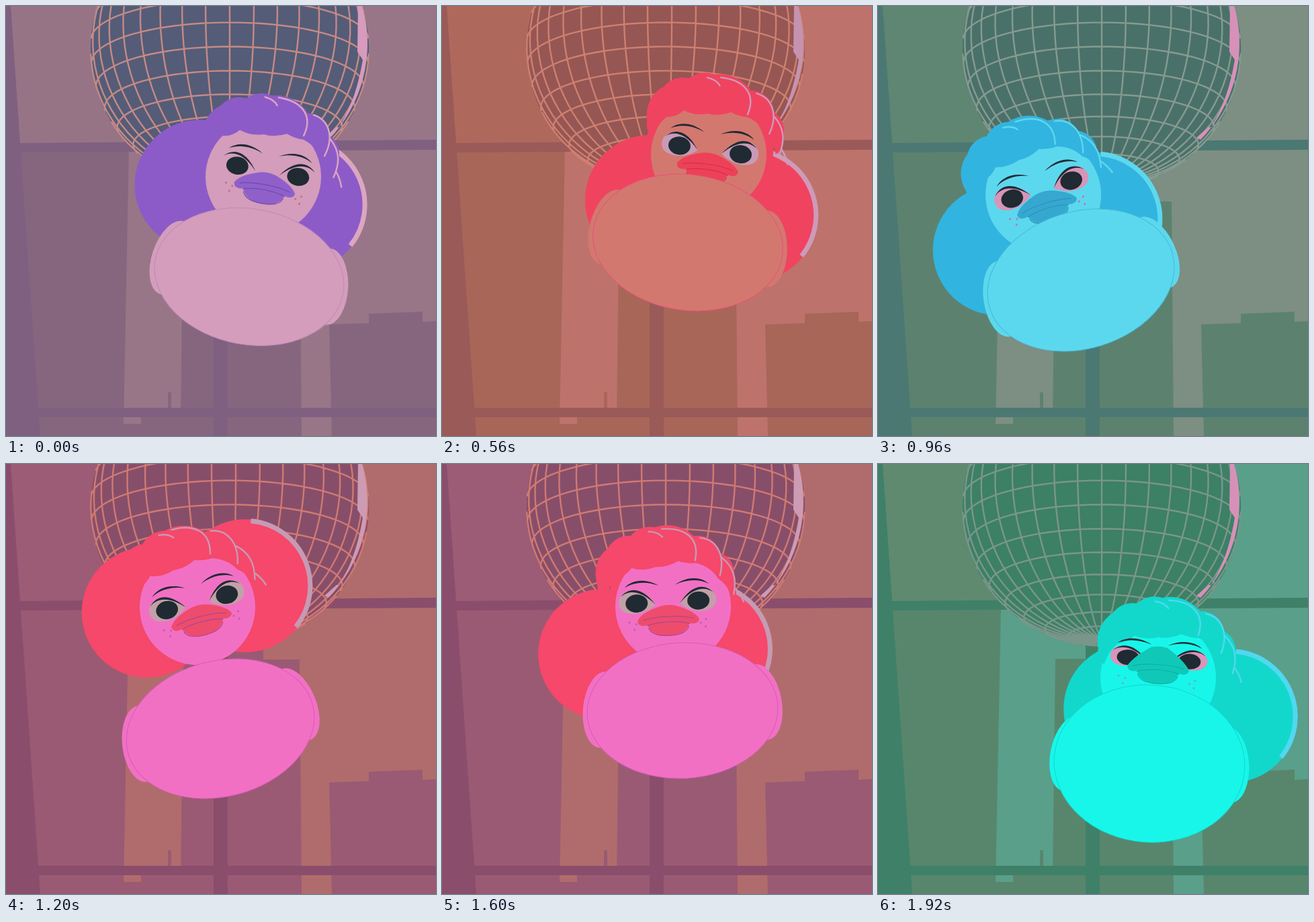
These frames come from a looping animation (640x640 px, 2 s). An HTML page:

```html
<!DOCTYPE html>
<html lang="en">
<head>
<meta charset="utf-8">
<title>Disco duck</title>
<style>
  html, body { margin: 0; width: 100%; height: 100%; overflow: hidden; }
  svg { display: block; width: 100vw; height: 100vh; }
  .sky { fill: var(--sky); }
  .pane { fill: var(--pane); }
  .building { fill: var(--building); }
  .beam { fill: var(--beam); }
  .ball { fill: var(--ball); }
  .shine { fill: var(--shine); }
  .hair { fill: var(--hair); }
  .skin { fill: var(--skin); }
  .white { fill: var(--white); }
  .beak { fill: var(--beak); }
  .ink { fill: #202a32; }
  .freckles { fill: var(--freckle); }
  .grid { fill: none; stroke: var(--grid); stroke-width: 2.4; }
  .curl { fill: none; stroke: var(--curl); stroke-width: 2.4; stroke-linecap: round; }
  .crescent { fill: none; stroke: var(--curl); stroke-width: 7; }
  .crease { fill: none; stroke: var(--crease); stroke-width: 1.2; }
  .edge { stroke: var(--edge); stroke-width: 1; }
</style>
</head>
<body>
<svg viewBox="0 0 640 640" preserveAspectRatio="none">
  <defs>
    <clipPath id="ballClip"><circle cx="333" cy="64" r="208"/></clipPath>
    <g id="eye">
      <path class="white" d="M29 4C18-14 0-22-14-17C-28-12-30 8-16 14C0 20 18 14 29 4Z"/>
      <ellipse class="ink" cx="1" cy="1" rx="16.5" ry="13.5"/>
      <path class="ink" d="M-22-10C-10-24 10-24 29 4C8-19-10-20-22-10Z"/>
    </g>
    <path id="brow" class="ink" d="M-16-23C-4-35 16-36 35-24C16-32-2-31-16-23Z"/>
    <path id="bangs" class="hair" d="M-94-14A30 30 0 0 1-104-38A46 46 0 0 1-86-89A36 36 0 0 1-51-106A38 38 0 0 1-14-117
      A56 56 0 0 1 43-101A34 34 0 0 1 81-74A32 32 0 0 1 100-41Q104-30 98-21L93-14Q88-30 76-38
      Q66-56 44-63Q32-62 18-67Q0-58-16-60Q-34-54-52-60Q-62-48-75-47Q-84-38-88-30Z"/>
  </defs>

  <rect class="sky" width="640" height="640"/>
  <path class="pane" d="M0 0H330V210H0Z"/>
  <path class="building" d="M20 211H183L175 622H201V612H260L264 290H310V271H383V291H437L440 640H20Z
    M481 474L540 472V458L620 455V470L640 469V640H485Z M241 575H246V600H241Z"/>
  <path class="beam" d="M0 0H7L51 640H0Z M20 204L640 199V214L20 218Z M48 598H640V612H49Z M309 218H330V640H309Z"/>

  <g clip-path="url(#ballClip)">
    <circle class="ball" cx="333" cy="64" r="207"/>
    <path class="grid" id="grid"/>
    <path class="shine" d="M524 0L523 68L531 80Q521 140 497 178V181L492 180L474 196L480 199A205 205 0 0 0 530 0Z"/>
  </g>

  <g id="leftLobe"><circle class="hair" r="97"/></g>
  <g id="rightLobe">
    <circle class="hair" r="99"/>
    <path class="crescent" d="M8-96.5A97 97 0 0 1 75 61"/>
  </g>

  <g id="head">
    <circle class="hair" cy="-10" r="95"/>
    <circle class="skin" r="86"/>
    <use href="#bangs" id="fringe"/>
    <g id="cap">
      <use href="#bangs"/>
      <path class="curl" d="M-24-113Q-10-112-4-104 M-4-116C30-117 52-100 43-67 M52-100C74-97 89-76 79-43
        M83-69C99-55 104-38 98-14 M100-23Q108-14 112-2"/>
    </g>
    <g id="face">
      <g id="leftEye"><use href="#eye"/><use href="#brow"/></g>
      <g id="rightEye"><use href="#eye"/><use href="#brow"/></g>
      <g class="freckles">
        <circle cx="-58" cy="29" r="1.6"/><circle cx="-48" cy="32" r="1.6"/><circle cx="-51" cy="40" r="1.6"/>
        <circle cx="56" cy="29" r="1.6"/><circle cx="48" cy="34" r="1.6"/><circle cx="55" cy="40" r="1.6"/>
      </g>
      <g id="beak">
        <path class="beak" d="M-32 6C-28 22-15 26 0 26C15 26 28 22 32 6Z"/>
        <path class="beak" id="upperBeak"/>
        <path class="crease" d="M-38 2C-18-4 18-4 38 2M-32 10C-16 4 16 4 32 10M-30 13C-27 23-14 26 0 26C14 26 27 23 30 13"/>
      </g>
    </g>
  </g>

  <g id="body">
    <ellipse class="skin" cx="-118" cy="-7" rx="30" ry="57" transform="rotate(8 -118 -7)"/>
    <ellipse class="skin" cx="118" cy="-7" rx="30" ry="57" transform="rotate(-8 118 -7)"/>
    <ellipse class="skin edge" id="belly" rx="142"/>
  </g>
</svg>

<script>
const FRAME = 80, LOOP = 2000, BEAT = 6.25;
const el = id => document.getElementById(id);
const svg = document.querySelector('svg');

const roles = ['sky', 'pane', 'building', 'beam', 'ball', 'grid', 'shine', 'hair', 'skin', 'white',
  'beak', 'crease', 'curl', 'edge', 'freckle'];
const palettes = {
  violet: '#987687 #967485 #86667f #7f6080 #555c78 #c58a85 #d79bbd #8d5bc8 #d39dbb #d39dbb #9060ca #7048b0 #dca6c0 #c08abc #c2708f',
  coral: '#bd736b #ae695c #a86659 #9a5a58 #965653 #cd8071 #c593b0 #f04360 #d3786f #c99ab5 #ee4058 #d03050 #cf9aba #e8507a #d3786f',
  azure: '#7d8e83 #5f8672 #5c826f #4b7872 #49716a #879a8f #d791b9 #32b4e0 #5cd8ee #d795b9 #36a8d0 #2b90bc #5cd8ee #45b8d8 #be78b4',
  pink: '#b06c6c #9c5c76 #9a5a74 #8a4e6c #874e6a #d07a72 #cd9bb4 #f5486a #f270c4 #c2a0a8 #ee4c6c #a84890 #c79ab4 #d45cb4 #c45cb4',
  teal: '#5a9f8a #5f8a70 #58866c #3f8068 #3c8066 #7a968a #d791b9 #12d8cc #18f6ea #d795b9 #10c8b8 #0fb0a4 #50d8f0 #14d6cc #6eaac8'
};
const cues = [[21, 'teal'], [15, 'pink'], [9, 'azure'], [2, 'coral'], [0, 'violet']];

// Monotone cubic through the knots
function curve(xs, ys, x) {
  const last = xs.length - 1;
  const slope = i => (ys[i + 1] - ys[i]) / (xs[i + 1] - xs[i]);
  const tangent = i => {
    if (i === 0) return slope(0);
    if (i === last) return slope(last - 1);
    const a = slope(i - 1), b = slope(i);
    return a * b > 0 ? 2 * a * b / (a + b) : 0;
  };
  let i = 0;
  while (i < last - 1 && x >= xs[i + 1]) i++;
  const h = xs[i + 1] - xs[i], u = (x - xs[i]) / h, v = 1 - u;
  return v * v * (1 + 2 * u) * ys[i] + u * u * (3 - 2 * u) * ys[i + 1]
    + h * u * v * (v * tangent(i) - u * tangent(i + 1));
}

const swayKnots = [0, 4, 7, 12, 15, 20, 24];
const sway = {
  bodyX: [362, 367, 366, 302, 319, 358, 404],
  roll: [10.5, 8.7, 8, -17, -14.4, -2.8, 4],
  headX: [21, 28, 31, -56, -34, -14, 13],
  faceX: [5, -6, 1, 0, 1, -8, -1],
  capX: [5, 1, 6, -4, -5, -7, 12]
};
const beatKnots = [0, .12, .2, .4, .64, .84, .92];
const bounce = {
  bodyY: [403, 352, 367, 394, 440, 446, 408],
  headY: [-149, -131, -155, -181, -174, -128, -127],
  lobeX: [-20, -12, -28, -2, 31, 32, 5],
  lobeY: [27, 79, 67, -12, -14, 52, 59],
  bellyR: [101, 101, 101, 101, 101, 117, 102],
  capY: [-4, 0, 0, -5, -14, 0, 0],
  pitch: [.1, 0, 0, 0, 0, 1, .05]
};
const wrap = (list, step) => [...list.slice(-2).map(v => v - step), ...list, ...list.slice(0, 2).map(v => v + step)];
const wrappedBeat = wrap(beatKnots, 1);

function pose(frame) {
  const phase = frame / BEAT % 1, p = {};
  for (const k in sway) p[k] = curve(swayKnots, sway[k], frame);
  for (const k in bounce) p[k] = curve(wrappedBeat, wrap(bounce[k], 0), phase);
  return p;
}

function ballGrid(spin) {
  const rad = Math.PI / 180, tilt = 17 * rad, r = 207;
  const point = (lat, lon) => {
    const c = Math.cos(lat * rad), s = Math.sin(lat * rad), z = c * Math.cos(lon * rad);
    const x = 333 + r * c * Math.sin(lon * rad);
    const y = 64 + r * (s * Math.cos(tilt) - z * Math.sin(tilt));
    return { x, y, front: z * Math.cos(tilt) + s * Math.sin(tilt) > 0 };
  };
  let d = '';
  const line = (from, to, at) => {
    let pen = 'M';
    for (let a = from; a <= to; a += 4) {
      const q = at(a);
      if (q.front) d += pen + q.x.toFixed(1) + ' ' + q.y.toFixed(1);
      pen = q.front ? 'L' : 'M';
    }
  };
  for (let lat = -14; lat < 90; lat += 10) line(-180, 180, lon => point(lat, lon));
  for (let lon = -180; lon < 180; lon += 10) line(-30, 90, lat => point(lat, lon + spin));
  return d;
}

const place = (id, x, y, extra = '') => el(id).setAttribute('transform', `translate(${x} ${y}) ${extra}`);

function draw(frame) {
  const p = pose(frame);
  const colors = palettes[cues.find(c => frame >= c[0])[1]].split(' ');
  roles.forEach((role, i) => svg.style.setProperty('--' + role, colors[i]));

  el('grid').setAttribute('d', ballGrid(-2.5 * (frame % 4)));

  const x = p.bodyX + p.headX, y = p.bodyY + p.headY, turn = `rotate(${p.roll})`;
  const lean = p.roll * 1.05 * Math.PI / 180;
  const dx = 76 * Math.cos(lean), dy = 76 * Math.sin(lean);
  place('leftLobe', x + p.lobeX - dx, y + p.lobeY - dy);
  place('rightLobe', x + p.lobeX + dx, y + p.lobeY + dy);
  place('head', x, y, turn);
  place('fringe', p.capX, -2);
  place('cap', p.capX, p.capY);
  place('face', p.faceX, -8 - 20 * p.pitch);

  const squint = 1 - .15 * p.pitch;
  place('leftEye', -47, 0, `scale(1 ${squint})`);
  place('rightEye', 47, 0, `scale(-1 ${squint})`);
  place('beak', 0, 25 - 14 * p.pitch);
  const top = -18 - 10 * p.pitch, side = -13 - 5 * p.pitch;
  el('upperBeak').setAttribute('d', `M-46 2C-40-8-28 ${side}-12 ${top}Q0 ${top - 3} 12 ${top}
    C28 ${side} 42-5 46 3Q46 10 36 10C18 4-18 4-36 10Q-46 10-46 2Z`);

  place('body', p.bodyX, p.bodyY, turn);
  el('belly').setAttribute('ry', p.bellyR);
}

let shown = -1;
const start = performance.now();
function tick() {
  const frame = Math.floor((performance.now() - start) % LOOP / FRAME);
  if (frame !== shown) draw(shown = frame);
  requestAnimationFrame(tick);
}
tick();
</script>
</body>
</html>
```
